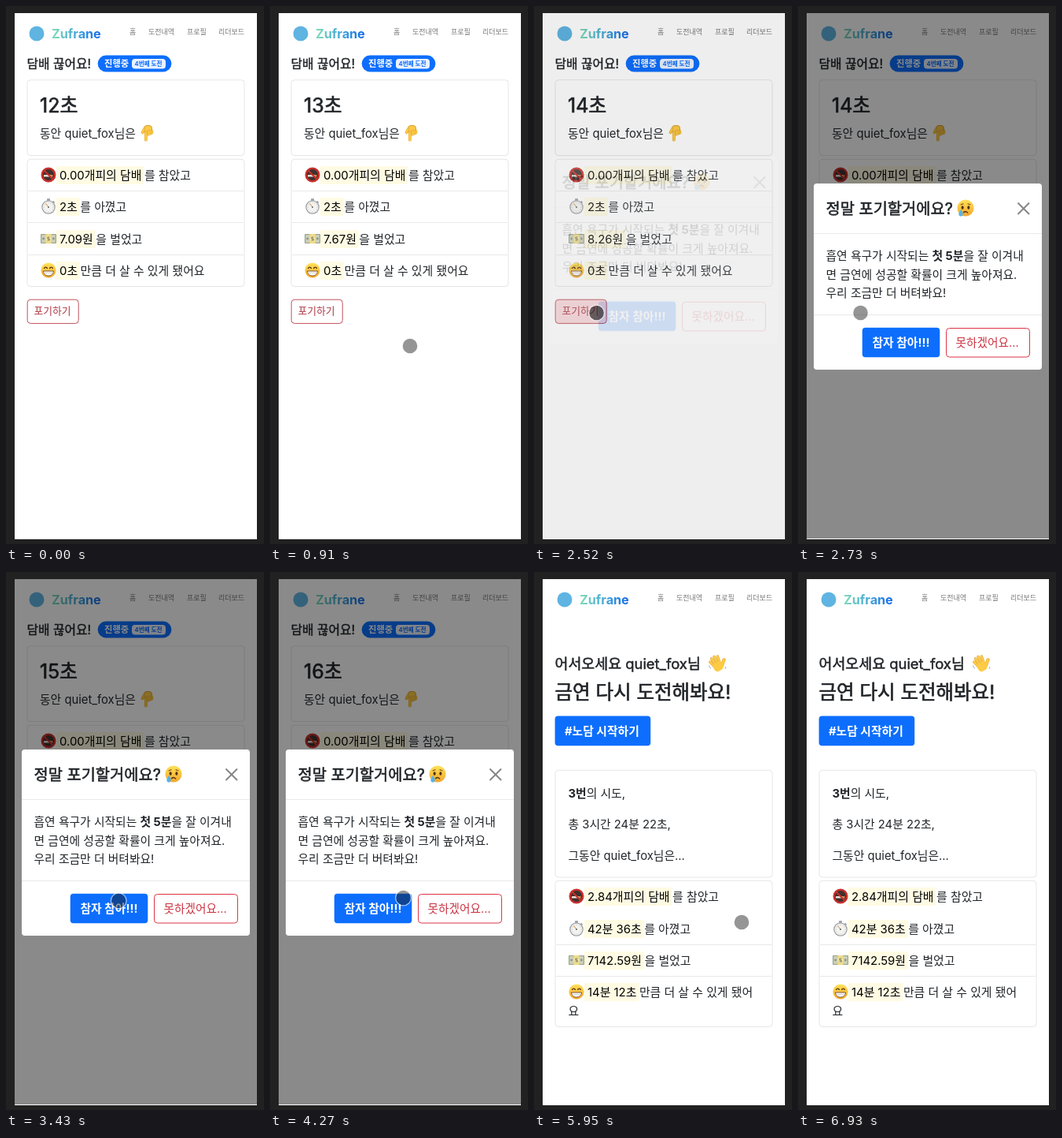
Write an HTML page with a canvas that moves like this. It is 328 by 682 pixels and loops after 7630 ms.

```html
<!DOCTYPE html>
<html lang="ko">
<head>
<meta charset="utf-8">
<style>
html, body { margin: 0; width: 100%; height: 100%; overflow: hidden; background: #212121; }
canvas { display: block; width: 328px; height: 682px; }
</style>
</head>
<body>
<canvas id="stage"></canvas>
<script>
const W = 328, H = 682, LOOP = 7630, STEP = 70;
const FONT = 'Inter, "Noto Sans CJK KR", "Noto Sans CJK", sans-serif';
const BLUE = '#0d6efd', RED = '#dc3545', INK = '#212529', LINE = '#e6e6e6';
const BRAND = 'Zufrane', USER = 'quiet_fox';
const MODAL_AT = 2498, PAGE_AT = 4970, DATA_AT = 5040;

const dpr = window.devicePixelRatio || 1;
const stage = document.getElementById('stage');
const layer = document.createElement('canvas');
function setup(canvas) {
  canvas.width = W * dpr;
  canvas.height = H * dpr;
  const c = canvas.getContext('2d');
  c.scale(dpr, dpr);
  return c;
}
const screen = setup(stage), modalCtx = setup(layer);
let ctx = screen;

const clamp = v => Math.max(0, Math.min(1, v));
const smooth = v => v * v * (3 - 2 * v);

// Draws text and returns the x where it ends.
function text(s, x, y, size, color = INK, weight = 400) {
  ctx.font = `${weight} ${size}px ${FONT}`;
  ctx.fillStyle = color;
  ctx.fillText(s, x, y);
  return x + ctx.measureText(s).width;
}

// Medium weight: Hangul only comes in regular and bold, so thicken the regular.
function heading(s, x, y, size) {
  text(s, x, y, size);
  ctx.strokeStyle = INK;
  ctx.lineWidth = size * 0.027;
  ctx.lineJoin = 'round';
  ctx.strokeText(s, x, y);
}

function box(x, y, w, h, r, fill, stroke) {
  ctx.beginPath();
  ctx.roundRect(x, y, w, h, r);
  if (fill) { ctx.fillStyle = fill; ctx.fill(); }
  if (stroke) { ctx.strokeStyle = stroke; ctx.lineWidth = 1; ctx.stroke(); }
}

function disc(x, y, r, fill) {
  ctx.beginPath();
  ctx.arc(x, y, r, 0, 7);
  ctx.fillStyle = fill;
  ctx.fill();
}

function oval(x, y, rx, ry, fill) {
  ctx.beginPath();
  ctx.ellipse(x, y, rx, ry, 0, 0, 7);
  ctx.fillStyle = fill;
  ctx.fill();
}

function stroke(color, width, ...pts) {
  ctx.beginPath();
  pts.forEach(([x, y], i) => i ? ctx.lineTo(x, y) : ctx.moveTo(x, y));
  ctx.strokeStyle = color;
  ctx.lineWidth = width;
  ctx.stroke();
}

const rule = (x1, x2, y) => stroke('#e9e9e9', 1, [x1, y], [x2, y]);

// A rounded finger that starts at x, y and points along the given angle.
function finger(x, y, length, angle, width = 3) {
  ctx.save();
  ctx.translate(x, y);
  ctx.rotate(angle);
  ctx.lineCap = 'round';
  stroke('#dc9c30', width + 0.8, [0, 0], [0, -length]);
  stroke('#fdcb45', width, [0, 0], [0, -length]);
  ctx.restore();
}

// Icons are drawn around the origin, about 20 units wide.
function face() {
  const g = ctx.createLinearGradient(0, -10, 0, 10);
  g.addColorStop(0, '#ffe35a');
  g.addColorStop(1, '#f2a52b');
  disc(0, 0, 9.6, g);
}

const icons = {
  noSmoking() {
    disc(0, 0, 9, '#40312f');
    box(-6, 0, 11, 2.6, 0.5, '#e9e2d8');
    box(2.5, 0, 3, 2.6, 0.5, '#d9843b');
    ctx.beginPath();
    ctx.arc(0, 0, 8.3, 0, 7);
    ctx.strokeStyle = '#c9302c';
    ctx.lineWidth = 2.4;
    ctx.stroke();
    stroke('#c9302c', 2.2, [-6, -6], [6, 6]);
  },
  stopwatch() {
    box(-2, -10, 4, 3.5, 1, '#a3a5a7');
    stroke('#a3a5a7', 2, [5.5, -6.5], [7.5, -4.5]);
    disc(0, 1, 8.8, '#a0a2a4');
    disc(0, 1, 7.5, '#f3f3f1');
    for (let i = 0; i < 12; i++) {
      const a = i * Math.PI / 6;
      disc(5.9 * Math.cos(a), 1 + 5.9 * Math.sin(a), 0.45, '#888');
    }
    stroke('#e08a2e', 1, [0, 1], [-3.5, -3.5]);
    disc(0, 1, 1, '#666');
  },
  money() {
    box(-10, -6, 20, 12, 1, '#9ba38c');
    box(-8.9, -4.9, 17.8, 9.8, 1, '#cbd0b9');
    box(-3.6, -6, 7.2, 12, 0.5, '#efd982');
    oval(0, 0, 3, 3.8, '#f7eab4');
    stroke('#7d7444', 1.1, [1.5, -2], [-1, -2], [-1, 0], [1.1, 0], [1.1, 2], [-1.5, 2]);
    disc(-6.4, 0, 1.4, '#8b967b');
    disc(6.4, 0, 1.4, '#8b967b');
  },
  grin() {
    face();
    for (const x of [-3.5, 3.5]) {
      ctx.beginPath();
      ctx.arc(x, -2, 1.9, Math.PI, 0);
      ctx.strokeStyle = '#5b3516';
      ctx.lineWidth = 1.4;
      ctx.stroke();
    }
    ctx.beginPath();
    ctx.moveTo(-6.5, 1);
    ctx.lineTo(6.5, 1);
    ctx.bezierCurveTo(6, 9, -6, 9, -6.5, 1);
    ctx.fillStyle = '#fff';
    ctx.fill();
    ctx.strokeStyle = '#6b4423';
    ctx.lineWidth = 0.9;
    ctx.stroke();
    stroke('#b9a78e', 0.6, [-6, 3.3], [6, 3.3]);
  },
  cry() {
    face();
    for (const s of [-1, 1]) {
      oval(s * 3.5, -0.5, 1.4, 2, '#4e3013');
      stroke('#7a4c1a', 1, [s * 2.3, -5], [s * 5.8, -3.7]);
    }
    ctx.beginPath();
    ctx.arc(0, 7.3, 3, Math.PI * 1.15, Math.PI * 1.85);
    ctx.strokeStyle = '#5b3516';
    ctx.lineWidth = 1.3;
    ctx.stroke();
    ctx.beginPath();
    ctx.moveTo(-5, 1.5);
    ctx.bezierCurveTo(-10, 7, -7.5, 10, -5, 9.6);
    ctx.bezierCurveTo(-2.2, 9.3, -3, 5, -5, 1.5);
    ctx.fillStyle = '#54b4ee';
    ctx.fill();
  },
  pointDown() {
    box(-4.5, -10, 10, 11, 3.5, '#fdcb45', '#dc9c30');
    finger(-2.2, -1, 9, Math.PI);
    for (let i = 0; i < 3; i++) finger(0.9 + i * 2.4, -3, 4.6 - i, Math.PI, 2.2);
    finger(-4.5, -5.5, 5, Math.PI + 0.45, 2.4);
  },
  wave() {
    ctx.rotate(-0.5);
    finger(4, 5, 7, 0.85, 2.8);
    for (let i = 0; i < 4; i++) {
      finger(-3.9 + i * 2.5, 1, [6, 8.3, 8.8, 7.4][i], -0.24 + i * 0.13, 2.2);
    }
    box(-5.3, -1, 10.8, 9.8, 4, '#fdcb45');
    stroke('#9bb0bd', 0.8, [-8.3, 2], [-8.5, -2]);
    stroke('#9bb0bd', 0.8, [7.5, 8], [5.5, 9.8]);
  }
};

function icon(name, x, y, size = 20) {
  ctx.save();
  ctx.translate(x, y);
  ctx.scale(size / 20, size / 20);
  icons[name]();
  ctx.restore();
}

// One list line: icon, highlighted value, trailing words.
function row(name, value, rest, y) {
  icon(name, 54, y);
  ctx.font = `400 14.9px ${FONT}`;
  const end = 68 + ctx.measureText(value).width + 3;
  box(64, y - 11, end - 64, 23, 1, '#fffbe3');
  text(value, 68, y + 5.5, 14.9, '#000');
  text(rest, end + 0.5, y + 5.5, 14.9);
}

function header() {
  disc(39, 35, 9.5, '#5fb4e2');
  const g = ctx.createLinearGradient(58, 0, 121, 0);
  g.addColorStop(0, '#84dcb8');
  g.addColorStop(0.5, '#45a8d8');
  g.addColorStop(1, '#1268e8');
  text(BRAND, 58, 40.5, 16.2, g, 700);
  [['홈', 157], ['도전내역', 181], ['프로필', 230], ['리더보드', 270]]
    .forEach(([s, x]) => text(s, x, 35.5, 9, '#777'));
}

function challengePage(t) {
  const ticks = Math.floor((t + 280) / 1050);
  heading('담배 끊어요!', 26.5, 78.5, 15.8);
  box(116.6, 62.6, 93.8, 20.8, 10.4, BLUE);
  text('진행중', 125, 77.3, 11.3, '#fff', 700);
  box(160, 67, 43, 12.5, 4, '#eaf2ff');
  text('4번째 도전', 163.5, 76, 7.6, BLUE, 700);

  box(27, 93.8, 276, 95.7, 4, null, LINE);
  heading(12 + ticks + '초', 43, 134.5, 25);
  text(`동안 ${USER}님은`, 43, 166.5, 14.8);
  icon('pointDown', 180, 161.5);

  box(27, 194.3, 276, 161.2, 4, null, LINE);
  [234.5, 274.5, 315.5].forEach(y => rule(28, 302, y));
  row('noSmoking', '0.00개피의 담배', '를 참았고', 214);
  row('stopwatch', '2초', '를 아꼈고', 254);
  row('money', (7.088 + 0.586 * ticks).toFixed(2) + '원', '을 벌었고', 295);
  row('grin', '0초', '만큼 더 살 수 있게 됐어요', 335);

  const press = clamp((t - 2470) / 250);
  box(27.2, 372.2, 65, 30.2, 4, `rgba(220,53,69,${press})`, '#c0525d');
  text('포기하기', 35.5, 391, 12.8, '#ae3744');
}

function homePage(t) {
  const ready = t >= DATA_AT;
  heading(`어서오세요 ${USER}님`, 26.5, 122.5, 18.4);
  icon('wave', 232, 116, 23);
  heading('금연 다시 도전해봐요!', 26.5, 160.5, 24.5);
  box(26.6, 182.6, 121.6, 37.6, 4, BLUE);
  text('#노담 시작하기', 39, 207, 14.8, '#fff', 700);

  box(27, 251.3, 276, 135.7, 4, null, LINE);
  text('의 시도,', text('3번', 43.5, 286, 14.8, INK, 700), 286, 14.8);
  text(ready ? '총 3시간 24분 22초,' : '총 0초,', 43.5, 325, 14.8);
  text(`그동안 ${USER}님은...`, 43.5, 365, 14.8);

  box(27, 391.3, 276, ready ? 185.2 : 161.2, 4, null, LINE);
  rule(28, 302, 472.5);
  rule(28, 302, 512.5);
  row('noSmoking', ready ? '2.84개피의 담배' : '0개피의 담배', '를 참았고', 411);
  row('stopwatch', ready ? '42분 36초' : '0초', '를 아꼈고', 452);
  row('money', ready ? '7142.59원' : '0원', '을 벌었고', 492);
  row('grin', ready ? '14분 12초' : '0초', '만큼 더 살 수 있게 됐어' + (ready ? '' : '요'), 532);
  if (ready) text('요', 43.5, 561.5, 14.9);
}

function modal(t) {
  box(20, 225, 290, 236, 4, '#fff');
  heading('정말 포기할거에요?', 35.5, 263.5, 19.8);
  icon('cry', 213, 256, 22);
  stroke('#858585', 2, [279.5, 249.5], [294, 264]);
  stroke('#858585', 2, [294, 249.5], [279.5, 264]);
  rule(20, 310, 288.5);
  const x = text('흡연 욕구가 시작되는 ', 35.5, 321.5, 14.8);
  text('을 잘 이겨내', text('첫 5분', x, 321.5, 14.8, INK, 700), 321.5, 14.8);
  text('면 금연에 성공할 확률이 크게 높아져요.', 35.5, 345.5, 14.8);
  text('우리 조금만 더 버텨봐요!', 35.5, 369, 14.8);
  rule(20, 310, 391.5);
  box(81.7, 407.7, 98.6, 37.6, 4, BLUE);
  text('참자 참아!!!', 94.5, 431.5, 14.8, '#fff', 700);
  const press = clamp((t - 4760) / 140);
  if (press) box(185, 405, 113, 43, 7, `rgba(220,53,69,${press * 0.4})`);
  box(188.5, 408.5, 106, 36.5, 4, '#fff', RED);
  box(188.5, 408.5, 106, 36.5, 4, `rgba(220,53,69,${press})`);
  text('못하겠어요...', 200.5, 431.5, 14.7, press > 0.5 ? '#fff' : '#cb3544');
}

function showModal(t) {
  const since = t - MODAL_AT;
  const fade = clamp(since / 150);
  const drop = -41 * (1 - clamp(since / 220)) ** 2;
  ctx.fillStyle = `rgba(0,0,0,${0.46 * fade})`;
  ctx.fillRect(11, 9, 308, 666);
  ctx = modalCtx;
  ctx.clearRect(0, 0, W, H);
  modal(t);
  ctx = screen;
  ctx.globalAlpha = fade;
  ctx.drawImage(layer, 0, drop, W, H);
  ctx.globalAlpha = 1;
}

// Pointer stops: time, x, y
const path = [
  [420, 193, 642], [770, 178, 431], [910, 178, 431], [980, 166, 426],
  [1120, 166, 426], [1610, 83, 390], [1820, 79.5, 389], [3010, 79.5, 389],
  [3570, 155, 422], [4130, 155, 422], [4270, 169.5, 413], [4690, 262.5, 434],
  [5530, 262.5, 434.5], [5600, 264, 444], [5950, 264, 444], [6510, 264, 700]
];

function pointer(t) {
  const next = path.findIndex(p => p[0] > t);
  if (next < 1) return;
  const [t0, x0, y0] = path[next - 1], [t1, x1, y1] = path[next];
  const k = smooth((t - t0) / (t1 - t0));
  const x = x0 + (x1 - x0) * k, y = y0 + (y1 - y0) * k;
  const pressed = (t >= 2310 && t < 2660) || (t >= 4760 && t < PAGE_AT);
  ctx.globalAlpha = clamp((t - 350) / 140);
  disc(x, y, 9.5, `rgba(20,20,20,${pressed ? 0.62 : 0.45})`);
  ctx.beginPath();
  ctx.arc(x, y, 9.9, 0, 7);
  ctx.strokeStyle = 'rgba(255,255,255,0.6)';
  ctx.lineWidth = 1.3;
  ctx.stroke();
  ctx.globalAlpha = 1;
}

function draw(t) {
  ctx.fillStyle = '#212121';
  ctx.fillRect(0, 0, W, H);
  ctx.fillStyle = '#fff';
  ctx.fillRect(11, 9, 308, 667);
  header();
  if (t < PAGE_AT) challengePage(t);
  else homePage(t);
  if (t >= MODAL_AT && t < PAGE_AT) showModal(t);
  pointer(t);
}

const start = performance.now();
function frame() {
  const t = (performance.now() - start) % LOOP;
  draw(Math.floor(t / STEP) * STEP);
  requestAnimationFrame(frame);
}
frame();
</script>
</body>
</html>
```
